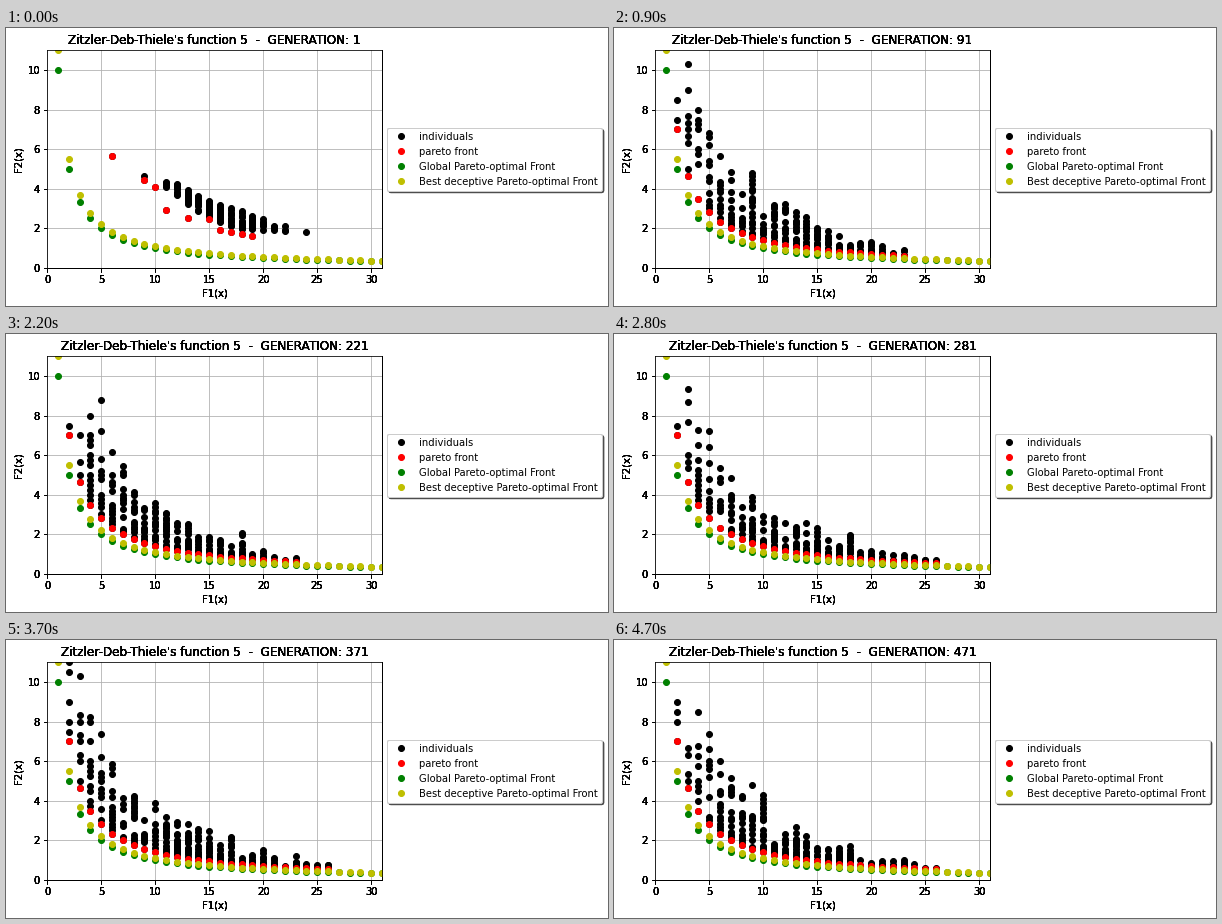
Write a matplotlib script that moves like this. It is 602 px wide and 278 px high and loops after 4.8 s.

```python
import numpy as np
import matplotlib.pyplot as plt
from matplotlib.animation import FuncAnimation

W, H, DPI = 602, 278, 72
FRAMES, STEP_MS = 48, 100
LAYERS = 6  # identical axes on top of each other give the heavy text and shadow
BEST = 14   # lowest g reached; every point lies on f2 = g / f1


def first_population(rng):
    """A random cloud with a few leading points below it."""
    pts = {(6, 34), (9, 40), (10, 41), (11, 32), (13, 33), (15, 37)}
    pts |= {(x, 31) for x in range(16, 20)}
    for x in range(9, 25):
        lo = int(np.ceil(np.interp(x, [9, 10, 15, 18, 24], [42, 46, 38, 35, 44])))
        hi = int(np.interp(x, [9, 12, 18, 24], [42, 51, 52, 44]))
        keep = 0.9 if x < 20 else 0.5
        pts |= {(x, g) for g in range(lo, hi + 1) if rng.random() < keep}
    return pts


def population(k):
    """Points (f1, g): a full front at the base, thinning out upwards."""
    rng = np.random.default_rng(k)
    if k == 0:
        return first_population(rng)
    base = BEST + int(16 * np.exp(-k / 1.6))
    x_min = max(2, 5 - k)
    x_max = 21 if k < 7 else 23 if k < 26 else 26
    pts = set()
    for x in range(x_min, x_max + 1):
        lo = base + (rng.integers(0, 3) if base > BEST else 0)
        mean = np.interp(x, [2, 4, 10, 16, 26], [22, 34, 36, 28, 16])
        top = int(np.clip(rng.normal(mean, 5), lo + 1, 22 if x == 2 else 46))
        pts |= {(x, lo), (x, top)}
        for g in range(lo + 1, top):
            if rng.random() < 0.8 - 0.6 * (g - lo) / (top - lo):
                pts.add((x, g))
    return pts


def split_front(pts):
    """Points as (f1, f2) arrays: all of them, and the non-dominated ones."""
    xy = sorted((x, g / x) for x, g in pts)
    front, low = [], np.inf
    for x, y in xy:
        if y < low:
            front.append((x, y))
            low = y
    return np.array(xy).T, np.array(front).T


plt.rcParams.update({"font.family": "DejaVu Sans", "font.size": 10})
fig = plt.figure(figsize=((W + 1e-6) / DPI, (H + 1e-6) / DPI), dpi=DPI)
box = [41.1 / W, 38.2 / H, 334.8 / W, 217.44 / H]
layers = [fig.add_axes(box) for _ in range(LAYERS)]
top_ax = layers[-1]

f1 = np.arange(1, 32)
people, = top_ax.plot([], [], "ko", label="individuals")
pareto, = top_ax.plot([], [], "ro", label="pareto front")
best, = top_ax.plot(f1, 10 / f1, "go", label="Global Pareto-optimal Front")
trap, = top_ax.plot(f1, 11 / f1, "yo", label="Best deceptive Pareto-optimal Front")

for ax in layers:
    ax.set(xlim=(0, 31), ylim=(0, 11), xlabel="F1(x)", ylabel="F2(x)",
           xticks=range(0, 31, 5), yticks=range(0, 11, 2))
    ax.grid(True)
    ax.legend(handles=[people, pareto, best, trap], loc="center left",
              bbox_to_anchor=(1, 0.5), fancybox=True, shadow=True)


def update(k):
    cloud, front = split_front(population(k))
    people.set_data(*cloud)
    pareto.set_data(*front)
    for ax in layers:
        ax.set_title(f"Zitzler-Deb-Thiele's function 5  -  GENERATION: {10 * k + 1}")
    return people, pareto


anim = FuncAnimation(fig, update, frames=FRAMES, interval=STEP_MS, repeat=True,
                     repeat_delay=0, blit=False)
plt.show()
```
